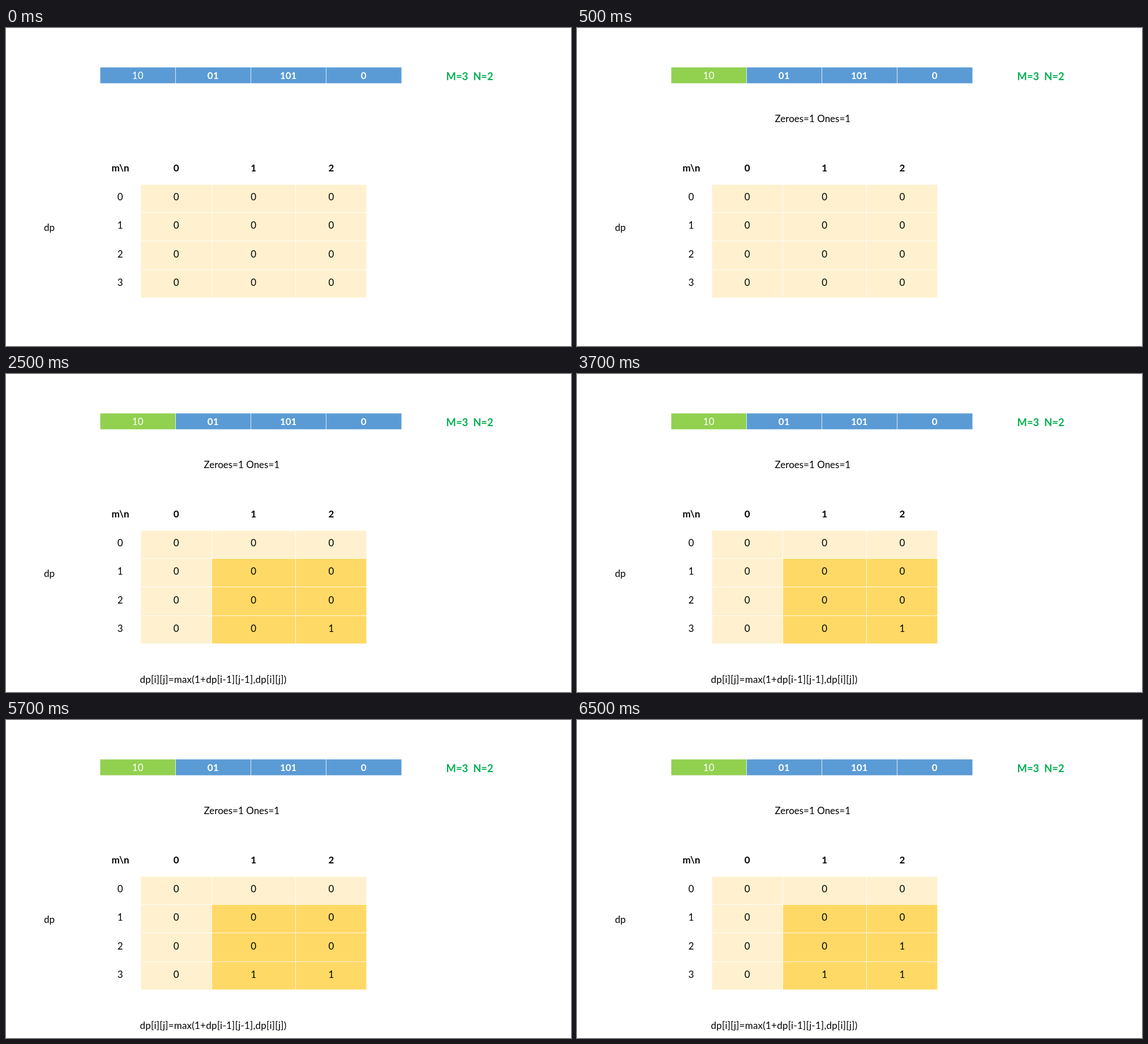
Animation, 998 px wide and 561 px high, one loop 8000 ms. Source, as an HTML page:

```html
<!DOCTYPE html>
<html lang="en">
<head>
<meta charset="utf-8">
<title>Knapsack table</title>
<style>
  html, body { margin: 0; width: 100%; height: 100%; overflow: hidden; background: #fff; }
  svg { display: block; width: 100vw; height: 100vh; font: 17px Lato, sans-serif; }
  text { white-space: pre; }
</style>
</head>
<body>
<svg id="stage" viewBox="0 0 998 561"></svg>
<script>
const stage = document.getElementById('stage');
const LOOP = 8000;
const BLUE = '#5b9bd5', GREEN = '#92d050', CREAM = '#fff1cf', GOLD = '#ffd966';

function add(tag, attrs, content = '') {
  const el = document.createElementNS('http://www.w3.org/2000/svg', tag);
  for (const key in attrs) el.setAttribute(key, attrs[key]);
  el.textContent = content;
  return stage.appendChild(el);
}
const rect = (x, y, x2, y2, fill) => add('rect', { x, y, width: x2 - x, height: y2 - y, fill });
const label = (x, y, str, attrs) => add('text', { x, y, ...attrs }, str);
const line = (x1, y1, x2, y2) =>
  add('path', { d: `M${x1} ${y1}L${x2} ${y2}`, stroke: '#fff', 'stroke-opacity': 0.75 });
const mid = { 'text-anchor': 'middle' };
const bold = { 'font-weight': 700 };

// Row of strings
const strips = ['10', '01', '101', '0'].map((str, i) => {
  const x = 166.5 + 133 * i;
  const box = rect(x, 69.5, x + 133, 97.5, BLUE);
  label(x + 66.2, 90, str, { ...mid, fill: '#fff', 'font-weight': i ? 700 : 400 });
  return box;
});
for (let x = 299.5; x < 600; x += 133) line(x, 69, x, 98);

label(777.5, 92, 'M=3  N=2', { ...bold, fill: '#00b050', 'font-size': 18.4 });
label(67, 358, 'dp');
const counts = label(349.5, 166, 'Zeroes=1 Ones=1');
const formula = label(236.5, 545, 'dp[i][j]=max(1+dp[i-1][j-1],dp[i][j])', { 'letter-spacing': 0.22 });

// Table of results
const xs = [238.5, 363.5, 511.5, 636.5];
const ys = [276.5, 325.5, 375.5, 426.5, 475.5];
const rows = [304, 354, 405, 455];
const cols = [300.7, 437.2, 574.5];
label(202, 253, 'm\\n', { ...mid, ...bold });
cols.forEach((x, j) => label(x, 253, j, { ...mid, ...bold }));
rows.forEach((y, i) => label(201.7, y, i, mid));
const boxes = rows.map((_, i) =>
  cols.map((_, j) => rect(xs[j], ys[i], xs[j + 1], ys[i + 1], CREAM)));
for (const x of xs.slice(1, 3)) line(x, 276, x, 476);
for (const y of ys.slice(1, 4)) line(238, y, 637, y);
const values = rows.map(y => cols.map(x => label(x, y, 0, mid)));

// Cells set to 1, with the time of each
const updates = [[3, 2, 2500], [3, 1, 4500], [2, 2, 6500]];

function draw(now) {
  const t = now % LOOP;
  const started = t >= 500, filling = t >= 2500;
  strips[0].setAttribute('fill', started ? GREEN : BLUE);
  counts.setAttribute('visibility', started ? 'visible' : 'hidden');
  formula.setAttribute('visibility', filling ? 'visible' : 'hidden');
  boxes.forEach((row, i) => row.forEach((box, j) =>
    box.setAttribute('fill', filling && i && j ? GOLD : CREAM)));
  for (const [i, j, at] of updates) values[i][j].textContent = t >= at ? 1 : 0;
}

const start = performance.now();
function tick() {
  draw(performance.now() - start);
  requestAnimationFrame(tick);
}
tick();
</script>
</body>
</html>
```
